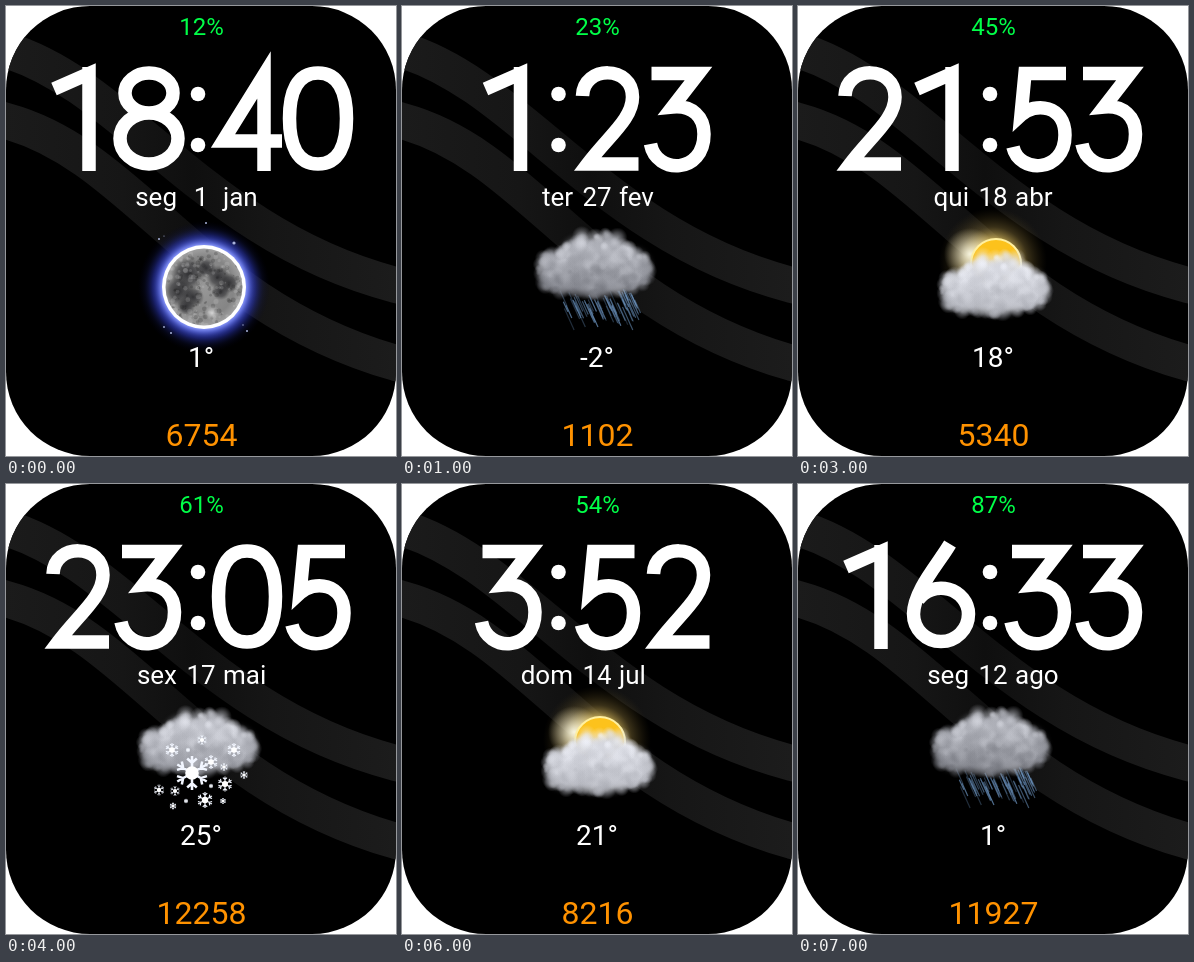
Animation, 390 px wide and 450 px high, one loop 8000 ms. Source, as an HTML page with a canvas:

```html
<!DOCTYPE html>
<html lang="pt">
<head>
<meta charset="utf-8">
<title>Watch face</title>
<style>
  html, body { margin: 0; width: 100%; height: 100%; overflow: hidden; background: #fff; }
  canvas, svg { position: absolute; left: 0; top: 0; }
  text { font-family: Roboto, sans-serif; fill: #fff; text-anchor: middle; }
</style>
</head>
<body>
<canvas id="scene" width="390" height="450"></canvas>
<svg width="390" height="450">
  <text id="battery" x="195.5" y="29" font-size="24" style="fill:#00ff48"></text>
  <g id="clock" fill="none" stroke="#fff" stroke-width="13.5" stroke-miterlimit="10"></g>
  <g font-size="26">
    <text id="weekday" x="171" y="200" style="text-anchor:end"></text>
    <text id="day" x="195" y="200"></text>
    <text id="month" x="217" y="200" style="text-anchor:start"></text>
  </g>
  <text id="temp" x="195" y="361" font-size="28"></text>
  <text id="steps" x="195.5" y="440" font-size="32" style="fill:#ff9200"></text>
</svg>
<script>
const STEP = 1000;
const FIELDS = ['battery', 'weekday', 'day', 'month', 'temp', 'steps'];
const STATES = [
  ['18:40', moon, '12%', 'seg', '1', 'jan', '1°', '6754'],
  ['1:23', rain, '23%', 'ter', '27', 'fev', '-2°', '1102'],
  ['11:26', storm, '72%', 'qua', '20', 'mar', '26°', '2092'],
  ['21:53', sunny, '45%', 'qui', '18', 'abr', '18°', '5340'],
  ['23:05', snow, '61%', 'sex', '17', 'mai', '25°', '12258'],
  ['4:30', cloudy, '88%', 'sáb', '22', 'jun', '12°', '3583'],
  ['3:52', sunny, '54%', 'dom', '14', 'jul', '21°', '8216'],
  ['16:33', rain, '87%', 'seg', '12', 'ago', '1°', '11927']
];

// Digit strokes, centred on x = 0
const DIGITS = {
  0: 'M0 67C21 67 28.5 86 28.5 112.5S21 158 0 158S-28.5 139 -28.5 112.5S-21 67 0 67Z',
  1: 'M-24 83L11 67.5V165M11 61V80',
  2: 'M-25 90C-24 59 25 59 25 91C25 113 1 130 -20 158H31',
  3: 'M-27 67.5H20L-6 101C14 99 25.5 111 25.5 128C25.5 168 -22 169 -28 138',
  4: 'M17 165V69L-24 135H35',
  5: 'M27 67.5H-14L-18 109C-4 96 26 99 26 129C26 167 -20 168 -26 141',
  6: 'M9 60C-2 79 -27 106 -27.5 130A27.5 27.5 0 1 0 27.5 130A27.5 26 0 0 0 -23 116',
  8: 'M0 67A24 20 0 1 1 0 107A24 20 0 1 1 0 67ZM0 107A29 25.5 0 1 1 0 158A29 25.5 0 1 1 0 107Z'
};

const $ = id => document.getElementById(id);
const g = $('scene').getContext('2d');
const TAU = Math.PI * 2;
let seed = 1;

function rand(a = 0, b = 1) {
  seed = (seed * 16807) % 2147483647;
  return a + (b - a) * seed / 2147483647;
}

function radial(x, y, r, ...stops) {
  const fill = g.createRadialGradient(x, y, 0, x, y, r);
  stops.forEach(([at, color]) => fill.addColorStop(at, color));
  g.fillStyle = fill;
  g.fillRect(x - r, y - r, 2 * r, 2 * r);
}

function oval(x, y, rx, ry = rx) {
  g.beginPath();
  g.ellipse(x, y, rx, ry, 0, 0, TAU);
  g.fill();
}

function background() {
  g.clearRect(0, 0, 390, 450);
  g.fillStyle = '#000';
  g.beginPath();
  g.roundRect(0, 0, 390, 450, 84);
  g.fill();
  g.save();
  g.clip();
  const shade = g.createLinearGradient(0, 0, 390, 0);
  [[0, '#1b1b1b'], [.3, '#161616'], [.48, '#0f0f0f'], [.68, '#161616'], [1, '#1c1c1c']]
    .forEach(([at, color]) => shade.addColorStop(at, color));
  g.strokeStyle = shade;
  g.lineWidth = 36;
  g.stroke(new Path2D('M-20 37L0 44C120 80 200 230 390 279L410 284'));
  g.stroke(new Path2D('M-20 108L0 115C130 150 190 300 390 357L410 362'));
  g.restore();
}

// Soft puffs scattered over overlapping lobes, darker towards the bottom
function cloud(cx, cy, w, h, light, dark) {
  seed = 77;
  const lobes = [[-.33, .08, .18, .32], [-.13, -.1, .2, .36], [.1, -.12, .2, .38],
                 [.3, .04, .19, .32], [0, .2, .36, .25]];
  const tone = (v, a) => `rgba(${v},${v + 2},${v + 10},${a})`;
  g.save();
  g.filter = 'blur(3px)';
  g.fillStyle = tone((light + dark) >> 1, .95);
  for (const [x, y, rx, ry] of lobes) oval(cx + x * w, cy + y * h, rx * w * .92, ry * h * .92);
  g.restore();
  for (let i = 0; i < 420; i++) {
    const [lx, ly, rx, ry] = lobes[i % 5];
    const angle = rand(0, TAU), reach = Math.sqrt(rand());
    const dx = lx + Math.cos(angle) * reach * rx, dy = ly + Math.sin(angle) * reach * ry;
    const fade = Math.max(0, Math.min(1, dy + .5 + rand(-.28, .28)));
    const v = Math.round(light + (dark - light) * fade), r = rand(3, 10);
    radial(cx + dx * w, cy + dy * h, r, [0, tone(v, .5)], [.5, tone(v, .3)], [1, tone(v, 0)]);
  }
}

function sun() {
  radial(195, 256, 54, [0, '#fff3b0'], [.4, 'rgba(255,220,110,.75)'],
    [.65, 'rgba(190,160,80,.3)'], [1, 'rgba(100,80,30,0)']);
  radial(172, 248, 26, [0, 'rgba(255,255,240,.9)'], [1, 'rgba(255,240,190,0)']);
  g.fillStyle = '#fcc21c';
  oval(198, 258, 25);
  g.strokeStyle = '#fff0a0';
  g.lineWidth = 2;
  g.stroke();
}

function moon() {
  radial(198, 281, 66, [0, '#4b5cff'], [.64, '#4254e6'], [.78, 'rgba(38,48,160,.65)'],
    [.9, 'rgba(20,26,90,.22)'], [1, 'rgba(0,0,40,0)']);
  g.save();
  g.shadowColor = '#c8d2ff';
  g.shadowBlur = 9;
  g.fillStyle = '#fff';
  oval(198, 281, 42);
  g.restore();
  g.save();
  g.beginPath();
  g.arc(198, 281, 38.5, 0, TAU);
  g.clip();
  radial(198, 281, 40, [0, '#989898'], [.75, '#858585'], [1, '#a5a5a5']);
  for (const [x, y, r] of [[-16, -13, 17], [2, -19, 10], [14, -10, 12], [-25, 4, 15],
                           [-11, 10, 11], [25, -4, 10], [17, 4, 9], [-18, 19, 9]])
    radial(198 + x, 281 + y, r, [0, 'rgba(35,35,38,.85)'], [.6, 'rgba(45,45,48,.55)'], [1, 'rgba(60,60,60,0)']);
  seed = 9;
  for (let i = 0; i < 260; i++) {
    g.fillStyle = i % 2 ? 'rgba(225,225,225,.17)' : 'rgba(20,20,20,.2)';
    oval(198 + rand(-39, 39), 281 + rand(-39, 39), rand(.6, 2.6));
  }
  radial(206, 307, 8, [0, 'rgba(235,235,235,.8)'], [1, 'rgba(200,200,200,0)']);
  g.restore();
  g.fillStyle = '#aab4dc';
  for (const [x, y, r] of [[200, 217, 1], [228, 237, 1.6], [153, 233, 1], [158, 321, .9],
                           [165, 327, 1], [241, 325, 1], [237, 319, .7], [158, 230, .6]]) oval(x, y, r);
}

function rain() {
  seed = 31;
  g.lineWidth = 1.2;
  for (let i = 0; i < 62; i++) {
    const x = rand(158, 234), y = rand(283, 303), len = rand(10, 23);
    g.strokeStyle = `rgba(110,150,195,${rand(.25, .75)})`;
    g.beginPath();
    g.moveTo(x, y);
    g.lineTo(x + len * .45, y + len);
    g.stroke();
  }
  cloud(194, 260, 113, 66, 218, 110);
}

function bolt(path) {
  g.save();
  g.shadowColor = '#3a8cff';
  g.shadowBlur = 6;
  g.strokeStyle = '#c4e4ff';
  g.lineWidth = 1.5;
  g.stroke(new Path2D(path));
  g.restore();
}

function storm() {
  sun();
  bolt('M188 298L180 309L186 318L178 326L182 338M180 309L168 314L171 321L162 330M171 321L164 320');
  bolt('M214 300L220 308L227 311L225 321L232 327L231 336L242 345M227 311L237 317L240 328M220 308L211 316L214 325M186 318L196 325L200 337');
  cloud(198, 280, 106, 64, 244, 158);
}

function sunny() {
  sun();
  cloud(198, 280, 106, 64, 244, 168);
}

function flake(x, y, r) {
  g.strokeStyle = '#f2f6ff';
  g.lineWidth = Math.max(.8, r * .15);
  g.beginPath();
  for (let i = 0; i < 6; i++) {
    const a = i * TAU / 6 + TAU / 12;
    const at = (d, turn = 0) => [x + Math.cos(a + turn) * d * r, y + Math.sin(a + turn) * d * r];
    g.moveTo(x, y);
    g.lineTo(...at(1));
    g.moveTo(...at(.9, .32));
    g.lineTo(...at(.6));
    g.lineTo(...at(.9, -.32));
  }
  g.stroke();
  g.fillStyle = '#fff';
  oval(x, y, r * .4);
}

function snow() {
  cloud(194, 260, 115, 64, 232, 135);
  [[186, 289, 17], [166, 266, 7], [228, 266, 7], [205, 278, 7], [153, 306, 5.5], [169, 307, 5],
   [199, 316, 8], [219, 300, 7.5], [196, 256, 5], [238, 291, 4], [167, 322, 3.5], [180, 317, 2],
   [217, 317, 3], [182, 266, 2], [205, 302, 2], [218, 283, 4]].forEach(f => flake(...f));
}

function cloudy() {
  cloud(196, 271, 130, 82, 244, 158);
}

function clock(time) {
  const [hours, minutes] = time.split(':');
  const shift = hours.length === 1 ? -35.5 : 0;
  const centers = hours.length === 1 ? [143, 241, 312] : [72, 143, 241, 312];
  const dot = y => `<circle cx="${192 + shift}" cy="${y}" r="7.3" fill="#fff" stroke="none"/>`;
  $('clock').innerHTML = dot(88) + dot(139) + [...hours + minutes].map((digit, i) =>
    `<path transform="translate(${centers[i] + shift})" d="${DIGITS[digit]}"/>`).join('');
}

let shown = -1;
function render(now) {
  const index = Math.floor(now / STEP) % STATES.length;
  if (index !== shown) {
    shown = index;
    const [time, weather, ...labels] = STATES[index];
    background();
    weather();
    clock(time);
    FIELDS.forEach((id, i) => $(id).textContent = labels[i]);
  }
}

const start = performance.now();
function tick() {
  render(performance.now() - start);
  requestAnimationFrame(tick);
}
tick();
</script>
</body>
</html>
```
